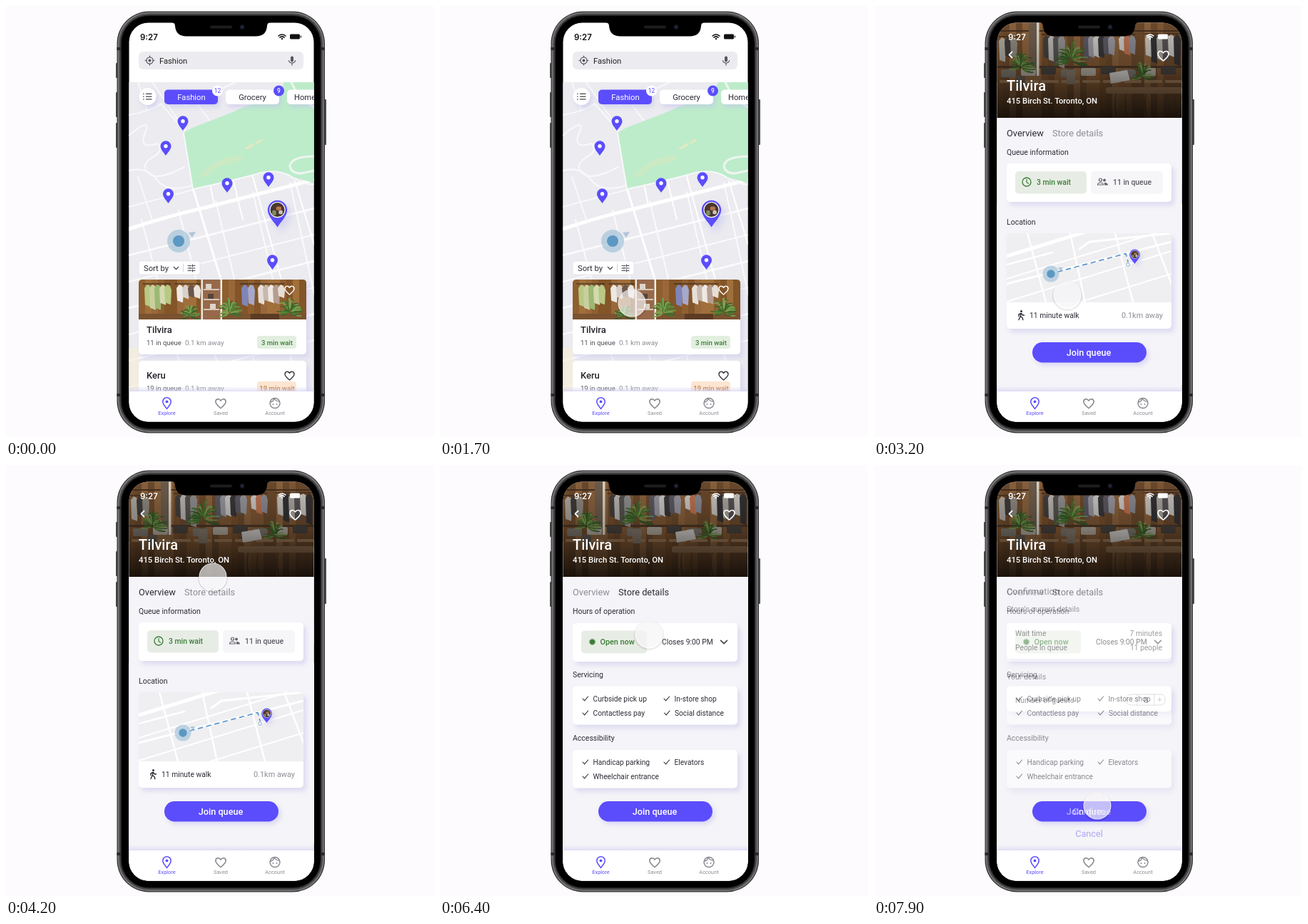
These frames come from a looping animation (600 px wide and 605 px high, 8000 ms). An HTML page:

```html
<!DOCTYPE html>
<html lang="en">
<head>
<meta charset="utf-8">
<title>Store queue app</title>
<style>
html, body { margin: 0; width: 100%; height: 100%; overflow: hidden; background: #fdfbfe; }
svg { display: block; width: 600px; height: 605px; font-family: Roboto, "Liberation Sans", sans-serif; }
.card { fill: #fff; filter: drop-shadow(4px 5px 3px #cdccec99); }
.chip { filter: drop-shadow(3px 4px 3px #c2c0ee88); }
.line { fill: none; stroke-linecap: round; stroke-linejoin: round; }
.page { animation: slide 8s infinite; }
.details { animation: details 8s infinite; }
.confirm { animation: confirm 8s infinite; }
.touch { animation: touch 8s infinite; }
@keyframes slide {
  0%, 28.4% { transform: translateX(260px); animation-timing-function: ease-out; }
  35.9%, 100% { transform: none; }
}
@keyframes details {
  0%, 57.75% { opacity: 0; animation-timing-function: ease-out; }
  62.75%, 100% { opacity: 1; }
}
@keyframes confirm {
  0%, 97.2% { opacity: 0; animation-timing-function: ease-out; }
  100% { opacity: .62; }
}
@keyframes touch {
  0%, 12% { transform: translate(630px, 430px); animation-timing-function: ease-out; }
  20.6% { transform: translate(269px, 417px); }
  32.5%, 38% { transform: translate(270px, 419px); animation-timing-function: ease-in-out; }
  50.5%, 53% { transform: translate(290px, 157px); animation-timing-function: ease-in-out; }
  57%, 76% { transform: translate(288px, 181px); animation-timing-function: ease-in-out; }
  89.3%, 100% { transform: translate(313px, 478px); }
}
</style>
</head>
<body>
<svg id="stage" viewBox="0 0 600 605"></svg>
<script>
const purple = '#5b4dfc', ink = '#2c2c36', grey = '#8d8d96', green = '#3c7d37';

let seed = 7;
const rnd = (a, b) => a + (b - a) * ((seed = seed * 16807 % 2147483647) / 2147483647);
const pick = list => list[rnd(0, list.length) | 0];
const times = (n, f) => Array.from({ length: n }, (_, i) => f(i)).join('');
const rect = (x, y, w, h, fill, r = 0, more = '') =>
  `<rect x="${x}" y="${y}" width="${w}" height="${h}" rx="${r}" fill="${fill}" ${more}/>`;
const circle = (x, y, r, fill, more = '') => `<circle cx="${x}" cy="${y}" r="${r}" fill="${fill}" ${more}/>`;
const line = (d, color, w = 1.2, more = '') =>
  `<path class="line" d="${d}" stroke="${color}" stroke-width="${w}" ${more}/>`;
const text = (x, y, size, str, fill = ink, weight = 400, anchor = 'start') =>
  `<text x="${x}" y="${y}" font-size="${size}" fill="${fill}" font-weight="${weight}" text-anchor="${anchor}">${str}</text>`;
const at = (x, y, body, scale = 1) => `<g transform="translate(${x} ${y}) scale(${scale})">${body}</g>`;
const card = (y, h, w = 231) => `<rect class="card" x="186" y="${y}" width="${w}" height="${h}" rx="5"/>`;

// Icons, centred on the given point
const heart = (x, y, color, s = 1) => at(x, y, line(
  'M0 6C-3 3.5-6.5 1-6.5-2.2C-6.5-6-2-7 0-3.6C2-7 6.5-6 6.5-2.2C6.5 1 3 3.5 0 6Z', color, 1.4), s);
const chevron = (x, y, color = ink, s = 1) => at(x, y, line('M-4-2L0 2L4-2', color, 1.5), s);
const check = (x, y) => line(`M${x - 4} ${y}l2.6 2.8l5-5.8`, ink, 1.1);
const pinShape = 'M0 0C-2.5-4-7.5-8.5-7.5-13.3A7.5 7.5 0 0 1 7.5-13.3C7.5-8.5 2.5-4 0 0Z';
const pin = (x, y) => at(x, y, `<path d="${pinShape}" fill="${purple}"/>` + circle(0, -13.2, 2.7, '#fff'));
const photoPin = (x, y, s) => at(x, y, `<path class="chip" d="${pinShape}" fill="${purple}"/>` +
  circle(0, -13.4, 5.8, '#4a372d', 'stroke="#fff" stroke-width=".6"') +
  rect(-4, -13, 3, 4, '#7f8e62', 1) + rect(-1, -16, 4, 3, '#b8764f', 1) + rect(1, -13, 3, 3, '#c9c3bd', 1), s);
const here = (x, y, s) => at(x, y, circle(0, 0, 16, '#9fc0d8', 'opacity=".65"') + circle(0, 0, 8, '#5c98c3') +
  '<path d="M14-12L24-13L19-5Z" fill="#9db7cf" opacity=".75"/>', s);

const status = color => text(188, 48, 11.5, '9:27', color, 600).replace('<text', '<text font-family="Inter, sans-serif"') +
  at(387, 46.5, line('M-5-4.5Q0-8.5 5-4.5M-3-2.3Q0-4.8 3-2.3', color, 1.6) + circle(0, -.5, 1.2, color)) +
  rect(398, 39.5, 14, 7, color, 1.6) + rect(412.8, 41.5, 1.2, 3, color, .5);

const nav = () => rect(172, 534, 260, 7, 'url(#lift)') + rect(172, 541, 260, 43, '#fff') +
  at(225.5, 565.5, line(pinShape, purple, 2) + circle(0, -13.2, 2.5, purple), .76) +
  heart(301, 558, '#85858d', 1.1) +
  circle(377, 557.5, 7, 'none', 'stroke="#85858d" stroke-width="1.4"') +
  line('M370.5 556Q375 555.5 376 551Q379 555.5 383.5 555', '#85858d', 1.3) +
  circle(374.5, 559, .9, '#85858d') + circle(379.5, 559, .9, '#85858d') +
  text(225.5, 574, 7.4, 'Explore', purple, 400, 'middle') +
  text(301, 574, 7.4, 'Saved', grey, 400, 'middle') + text(377, 574, 7.4, 'Account', grey, 400, 'middle');

// Shop interior made of planks, hanging clothes and plants
const plant = (x, y, r) => times(48, () => {
  const a = rnd(-3.5, .4), l = rnd(.4, 1) * r, dx = Math.cos(a) * l * .75, dy = Math.sin(a) * l;
  return line(`M${x + dx * .2} ${y + dy * .3}Q${x + dx * .5} ${y + dy} ${x + dx} ${y + dy * .85}`,
    pick(['#47702f', '#5b8a3a', '#38602a', '#7fa653']), 1.5);
});
const planks = (x, y, w, h, colors) => times(Math.ceil(w / 9), i =>
  rect(x + i * 9, y, Math.min(9.3, w - i * 9), h, pick(colors)));
const shirts = (x, y, n, h, colors, step = 7) => line(`M${x - 3} ${y}h${n * step + 4}`, '#2f221a', 1) +
  times(n, i => {
    const l = x + i * step, b = y + h * rnd(.65, 1);
    return `<path d="M${l - 1} ${y + 6}l4-5l4 2l2 6L${l + 8} ${b}L${l} ${b - 3}Z" fill="${colors[i % colors.length]}"/>`;
  });

const cardPhoto = () => '<g clip-path="url(#cardTop)">' +
  planks(186, 384, 235, 56, ['#8f5f2f', '#99683a', '#835528', '#a06f3a']) +
  rect(186, 432, 235, 8, '#7a5230') +
  shirts(195, 390, 5, 38, ['#b8c982', '#c9cf9f', '#9db873', '#d3d9b0'], 7) +
  shirts(240, 390, 4, 28, ['#ece8e3', '#d7cfca', '#6b564a', '#e9e4dd'], 8) +
  rect(273, 384, 29, 56, '#97694a') + rect(273.5, 384, 2.5, 56, '#eee6dc') + rect(300.5, 384, 2.5, 56, '#f4eee7') +
  times(3, i => rect(277, 397 + i * 14, 22, 2, '#d6c7b8') + rect(280 + i * 3, 390 + i * 14, 8, 7, i % 2 ? '#55443a' : '#ded4ca')) +
  shirts(331, 390, 2, 40, ['#8085b8', '#a6a8cc'], 9) +
  shirts(354, 390, 5, 30, ['#e7ded6', '#c5b9b0', '#f0e9e3', '#b59d90'], 7) +
  plant(258, 434, 18) + plant(313, 431, 24) + plant(398, 430, 25) +
  rect(343, 432, 40, 8, '#5b3b23') + '</g>';

const headerPhoto = () => planks(172, 23, 260, 134, ['#80552f', '#8b5f38', '#755030', '#966a42']) +
  rect(172, 34, 260, 2, '#4a3423') + rect(172, 84, 260, 3, '#513a28') +
  shirts(176, 43, 3, 42, ['#bdb7ae', '#45403d', '#99948b'], 8) +
  rect(217, 23, 12, 75, '#766453') + rect(228, 23, 3.5, 75, '#efe7d6') +
  shirts(238, 40, 4, 50, ['#494441', '#c9c6c3', '#5e5956', '#9d9a9a']) +
  shirts(294, 40, 6, 42, ['#63606a', '#a3a2aa', '#dcd9d5', '#3d3b3f']) +
  shirts(344, 40, 3, 36, ['#dedad6', '#cf7a55', '#96959d']) +
  shirts(381, 39, 6, 48, ['#d9d4ce', '#383638', '#b8b2a9', '#5d575a'], 8) +
  times(9, i => rect(178 + i * 28, 89 - i % 3 * 2, 21, 11, ['#827c72', '#b8b1a4', '#4b4540'][i % 3], 2) +
    rect(176 + i * 29, 104, 25, 4, '#a9835d', 1)) +
  `<path d="M330 94l25-4l4 14l-27 5Z" fill="#dedad5"/>` +
  rect(198, 98, 14, 16, '#6a5f53', 2) + rect(270, 92, 12, 18, '#8d8172', 2) +
  plant(205, 86, 28) + plant(276, 76, 33) + plant(377, 99, 24) +
  times(7, i => line(`M${340 + i * 14} 121q-4 14 0 33`, '#6c4e35', 2)) +
  rect(325, 114, 107, 9, '#a57c56', 3) + rect(172, 23, 260, 134, 'url(#shade)');

const cityMap = () => rect(172, 107, 260, 434, '#ebebf0') +
  times(6, i => line(`M172 ${350 + i * 37}L432 ${284 + i * 37}`, '#fbfbfd', i % 2 ? 2 : 2.8)) +
  times(5, i => line(`M${190 + i * 52} ${300 - i * 13}L${254 + i * 52} 541`, '#fbfbfd', 2)) +
  line('M172 313Q230 294 275 284L432 244', '#fff', 5) + line('M262 256L302 386', '#fff', 3) +
  line('M345 236L386 384M405 246L432 335M286 250L292 280M318 242L332 300', '#fff', 2) +
  line('M172 182Q205 154 195 178T213 193Q222 204 204 213Q188 224 200 235T250 226M172 231Q198 224 214 247Q230 262 260 252', '#f9f9fc', 2) +
  line('M172 153Q205 147 217 137L250 175M205 107L240 158M250 140L322 107M185 107L198 147M270 140L285 160', '#f8f8fb', 2) +
  line('M172 282L262 258M185 240L206 303', '#fafafd', 1.8) +
  `<path d="M249 179Q254 173 274 166L318 149Q343 136 366 134Q382 127 390 107H432V249Q412 242 400 240Q380 228 350 237L262 257Q256 221 249 179Z" fill="#bdecca"/>` +
  line('M249 179L262 257Q310 247 351 236Q380 227 401 240T432 250', '#f7f9fa', 2) +
  line('M432 211Q401 211 398 224Q399 235 414 235L432 231M400 107Q411 132 432 142', '#edf5f0', 3) +
  '<path d="M268 241Q287 221 304 214Q326 208 334 211Q325 221 310 222Q292 226 283 238Z" fill="#dce7bd" opacity=".45"/>' +
  '<path d="M333 201l13-9l3 3l-10 6Zm17-10l9-5l1 3l-9 5Z" fill="#e2e9c0"/>' +
  rect(172, 480, 14, 61, '#f7eedb', 0, 'opacity=".7"');

const smallMap = () => '<g clip-path="url(#mapTop)">' + rect(186, 319, 231, 97, '#efeff1') +
  times(4, i => line(`M186 ${351 + i * 32}L417 ${280 + i * 32}`, '#fff', i ? 2 : 5)) +
  line('M186 363L250 346M215 319L241 416M275 319L296 416M338 319L363 416M390 319L417 390', '#fff', 2.4) +
  line('M186 390L417 331M288 341L302 331L417 319', '#fff', 3) + '</g>' +
  line('M258 373L353 347.5L356 359', '#5f96cc', 1.7, 'stroke-dasharray="6 6"') +
  circle(356, 363, 2.2, '#fff', 'stroke="#6899c5" stroke-width=".8"') + here(248, 376, .72) + photoPin(365.5, 362, .98);

const storeRow = (y, name, queue, away, wait, bg, fg) => text(197, y, 13, name, '#24242c', 500) +
  text(197, y + 17, 9.5, queue, '#4e4e57') + text(251, y + 17, 9.8, away, '#8b8b94') +
  rect(352, y + 4, 55, 18, bg, 4) + text(380, y + 16.5, 9.5, wait, fg, 500, 'middle');

const explore = () => rect(172, 23, 260, 561, '#fff') + status('#111') +
  rect(186, 64, 231, 25, '#ececf0', 6) +
  circle(201.5, 76.5, 4.6, 'none', 'stroke="#55555e" stroke-width="1.3"') + circle(201.5, 76.5, 2, '#55555e') +
  line('M201.5 70v1.5m0 10v1.5M195 76.5h1.5m10 0h1.5', '#55555e') + text(215, 80.5, 11.2, 'Fashion', '#222') +
  rect(399, 70.5, 4, 8, '#55555e', 2) + line('M396.5 76.5Q397 80 401 80T405.5 76.5M401 80v3', '#55555e') +
  cityMap() +
  [[248, 175], [224, 210], [227.5, 277], [310, 262], [368, 254], [373.5, 370]].map(p => pin(...p)).join('') +
  photoPin(380.5, 310.5, 1.82) + here(242, 330, 1) +
  circle(198.5, 127, 12, '#fff', 'class="chip"') +
  times(3, i => line(`M196.5 ${123.3 + i * 3.8}h7.5m-11.5 0h.6`, '#44444d', 1.3)) +
  rect(222, 117.5, 75, 20.5, purple, 5, 'class="chip"') + text(260, 131.7, 11.2, 'Fashion', '#fff', 400, 'middle') +
  rect(308, 117.5, 75, 20.5, '#fff', 5, 'class="chip"') + text(345.5, 131.7, 11.2, 'Grocery', ink, 400, 'middle') +
  rect(394, 117.5, 75, 20.5, '#fff', 5, 'class="chip"') + text(404, 131.7, 11.2, 'Home', ink) +
  circle(296.5, 119, 7.5, '#fff') + text(296.5, 122, 8.4, '12', purple, 400, 'middle') +
  circle(382.5, 119, 7.5, purple) + text(382.5, 122, 8.4, '9', '#fff', 500, 'middle') +
  rect(186, 358, 86, 19, '#fff', 3, 'stroke="#dddde4" stroke-width=".7"') + text(193, 371.7, 11.2, 'Sort by') +
  chevron(238.5, 368, ink, .8) + line('M248.5 362v11', '#c9c9d0', .8) +
  line('M255 364.5h5m2.5 0h2.5m-10 3.5h2m2.5 0h5.5m-10 3.5h5m2.5 0h2.5M261.5 363v3m-3.5.5v3m3.5.5v3', '#44444d', 1) +
  card(384, 105, 235) + cardPhoto() + heart(397.5, 399, '#fff') +
  storeRow(459, 'Tilvira', '11 in queue', '0.1 km away', '3 min wait', '#e2efdf', green) +
  card(498, 60, 235) + heart(397.5, 519, '#33333c') +
  storeRow(523, 'Keru', '19 in queue', '0.1 km away', '19 min wait', '#fce5d1', '#c77a3a') +
  nav();

const button = label => rect(222, 472, 160, 28.5, purple, 14.2, 'class="chip"') +
  text(301, 490.5, 12.7, label, '#fff', 500, 'middle');
const panel = (name, body) => `<g class="${name}">` + rect(172, 157, 260, 384, '#f5f4f8') + body + '</g>';
const tabs = second => text(186, 182.5, 12.8, 'Overview', second ? grey : ink) +
  text(250, 182.5, 12.8, 'Store details', second ? ink : grey);
const checks = (x, y, label) => check(x, y) + text(x + 10.5, y + 4, 10.2, label);

const overview = () => panel('overview', tabs(false) +
  text(186, 208.5, 10.5, 'Queue information') + card(221, 54) +
  rect(198, 232, 100, 31.5, '#e7ede5', 5) +
  circle(214, 247, 6, 'none', `stroke="${green}" stroke-width="1.3"`) + line('M214 243.5v3.7l2.5 2', green, 1.2) +
  text(228, 251, 10.4, '3 min wait', green, 500) +
  rect(304, 232, 101, 31.5, '#f6f5f8', 5) +
  circle(317.5, 244, 2, 'none', 'stroke="#62626b" stroke-width="1.2"') + circle(323, 244.5, 1.9, '#62626b') +
  line('M313.5 251q0-3 4-3t4 3Z', '#62626b') + '<path d="M323 251.5v-3.5q4.5-.5 5 3.5Z" fill="#62626b"/>' +
  text(335, 251, 10.4, '11 in queue', '#5c5c65', 500) +
  text(186, 306.5, 10.5, 'Location') + card(319, 134) + smallMap() +
  circle(206.5, 428.5, 1.5, ink) + line('M206 431.5l-.6 4l2.6 2l.8 3M205.4 435.5l-2.4 5M206 431.5l-3 1.5v2.5M206.5 431.5l2 2.5h2', ink, 1.4) +
  text(218, 438, 10.3, '11 minute walk') + text(405, 438, 10.9, '0.1km away', grey, 400, 'end') +
  button('Join queue'));

const details = () => panel('details', tabs(true) +
  text(186, 209, 10.5, 'Hours of operation') + card(222, 54) + rect(198, 232.5, 92, 32, '#e7ede5', 5) +
  circle(213.5, 248.3, 3.6, green) + circle(213.5, 248.3, 4.2, 'none', `stroke="${green}" stroke-dasharray="1 1"`) +
  text(224.5, 252, 10.8, 'Open now', green, 500) + text(311, 252, 10.3, 'Closes 9:00 PM') + chevron(398, 248.5, '#44444d', 1.1) +
  text(186, 298, 10.5, 'Servicing') + card(310.5, 54) +
  checks(204, 328, 'Curbside pick up') + checks(318, 328, 'In-store shop') +
  checks(204, 348, 'Contactless pay') + checks(318.5, 348, 'Social distance') +
  text(186, 387, 10.5, 'Accessibility') + card(400, 53.5) +
  checks(204, 417, 'Handicap parking') + checks(318, 417, 'Elevators') + checks(204, 437, 'Wheelchair entrance') +
  button('Join queue'));

const pair = (y, label, value) => text(198, y, 10.3, label) + text(404, y, 10.3, value, ink, 400, 'end');
const confirm = () => panel('confirm', text(186, 182, 12.8, 'Confirmation') +
  text(186, 206, 10.7, 'Store’s current details') + card(222, 50) +
  pair(240, 'Wait time', '7 minutes') + pair(260, 'People in queue', '11 people') +
  text(186, 300.5, 10.5, 'Your details') + card(310.5, 35.5) + text(198, 334, 10.3, 'Number of guests') +
  rect(354, 322, 54, 15, '#fff', 6, 'stroke="#aaaab3" stroke-width=".8"') + line('M369 322v15m24-15v15', '#aaaab3', .8) +
  text(361.5, 333, 10, '-', grey, 400, 'middle') + text(381, 333.5, 10, '0', ink, 400, 'middle') +
  text(400.5, 333, 10, '+', grey, 400, 'middle') +
  button('Confirm') + text(301.5, 521.5, 12.7, 'Cancel', purple, 400, 'middle'));

const store = () => '<g class="page">' + rect(172, 23, 260, 561, '#f5f4f8') + headerPhoto() + status('#fff') +
  line('M193.5 64.5l-4 4l4 4', '#fff', 1.8) + heart(405.5, 70, '#fff', 1.15) +
  text(186, 119, 20, 'Tilvira', '#fff', 500) + text(186, 137, 11.3, '415 Birch St. Toronto, ON', '#fff', 500) +
  overview() + details() + confirm() + nav() + '</g>';

const shell = (inset, fill) =>
  rect(155.5 + inset, 7.5 + inset, 291.5 - 2 * inset, 592 - 2 * inset, fill, 45 - inset);
const phone = () => times(3, i => rect(154, [80, 121, 164][i], 4, [21, 35, 35][i], '#4a4a4a', 1)) +
  rect(445, 131, 4, 64, '#4a4a4a', 1) +
  shell(0, '#303030') + shell(1.2, '#7d7d7d') + shell(2.8, '#4d4d4d') + shell(5, '#222') + shell(6.5, '#000') +
  times(2, i => rect(155.5, 58 + i * 486, 5, 4, '#292929') + rect(442, 58 + i * 486, 5, 4, '#292929'));

const notch = '<path d="M231 23Q237 23 237 28Q238 42.5 253 42.5H350Q365 42.5 366 28Q366 23 372 23Z"/>' +
  rect(286, 27.5, 31, 4, '#1d1d1f', 2) + circle(331, 29.5, 3.4, '#15161d') + circle(331, 29.5, 1.5, '#25305c');

const touch = `<g class="touch">${circle(0, 1.5, 20, 'none', 'stroke="#000" stroke-opacity=".1" stroke-width="1.8"')}` +
  circle(0, 0, 19, '#f6f5f7', 'fill-opacity=".68" stroke="#fff" stroke-opacity=".75" stroke-width="1.2"') + '</g>';

document.getElementById('stage').innerHTML = `<defs>
  <clipPath id="screen"><rect x="172.5" y="23.5" width="259" height="560" rx="27"/></clipPath>
  <clipPath id="cardTop"><path d="M186 440V389q0-5 5-5h225q5 0 5 5v51Z"/></clipPath>
  <clipPath id="mapTop"><path d="M186 416V324q0-5 5-5h221q5 0 5 5v92Z"/></clipPath>
  <linearGradient id="lift" x2="0" y2="1"><stop stop-color="#d6d5f3" stop-opacity="0"/><stop offset="1" stop-color="#d6d5f3" stop-opacity=".75"/></linearGradient>
  <linearGradient id="shade" x2="0" y2="1"><stop stop-opacity=".1"/><stop offset=".5" stop-opacity=".32"/><stop offset="1" stop-opacity=".78"/></linearGradient>
</defs>` + phone() + `<g clip-path="url(#screen)">${explore()}${store()}</g>` + notch + touch;
</script>
</body>
</html>
```
